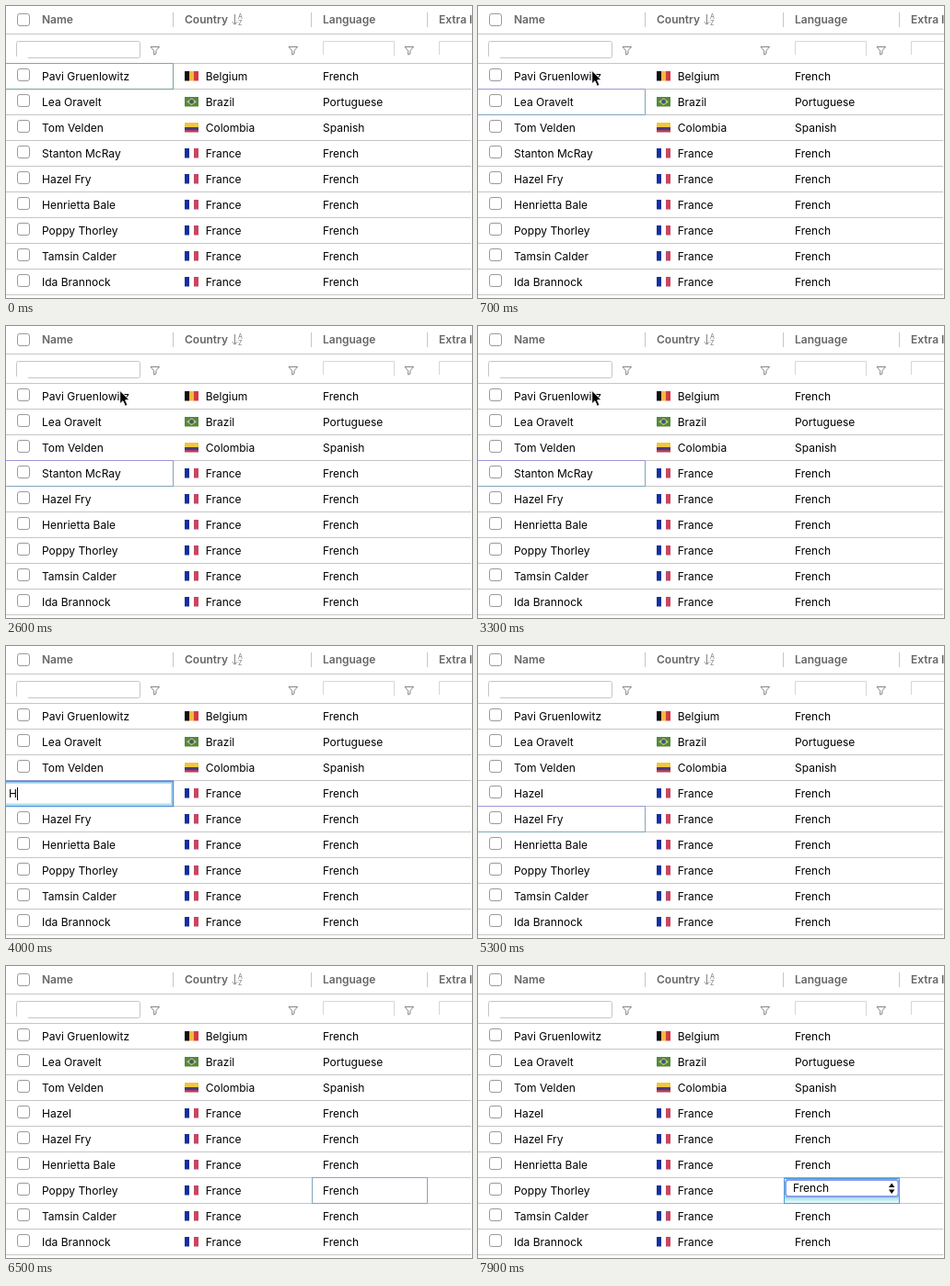
These frames come from a looping animation (506 by 318 pixels, 8 s). An HTML page:

```html
<!DOCTYPE html>
<html lang="en">
<head>
<meta charset="utf-8">
<style>
  html, body { margin: 0; width: 100%; height: 100%; overflow: hidden; background: #fff; }
  svg { display: block; width: 100vw; height: 100vh; }
  text { font: 12px Inter, Roboto, sans-serif; fill: #000; white-space: pre; }
  .head { font-weight: 600; fill: #666; }
  .line { stroke: #c6c6c6; fill: none; }
  .faint { stroke: #d6d6d6; fill: none; }
  .box { stroke: #9a9a9a; fill: #fff; }
  .icon { stroke: #858585; fill: none; }
</style>
</head>
<body>
<svg id="stage" viewBox="0 0 506 318">
  <defs>
    <linearGradient id="fade" x2="0" y2="1">
      <stop stop-color="#8ed8e0"/><stop offset="1" stop-color="#f2fdfd"/>
    </linearGradient>
  </defs>
  <g id="grid"></g>
  <g id="focus" fill="none">
    <path id="sides"/><path id="top"/>
  </g>
  <g id="editor">
    <rect x="-2" y="147" width="184" height="27.5" fill="#fff"/>
    <rect x="-2" y="149" width="182" height="23.5" fill="none" stroke="#a9e3ec" stroke-width="2"/>
    <rect x="-2" y="147.5" width="183.5" height="27" fill="none" stroke="#5d8fdc" stroke-width="1.5"/>
    <text id="typed" x="3" y="165"></text>
    <path id="caret" stroke="#000"/>
  </g>
  <g id="select">
    <rect x="332.5" y="231.5" width="125" height="27" fill="#fff" stroke="#4a9fdc"/>
    <rect x="333" y="251" width="124" height="7" fill="url(#fade)"/>
    <rect x="334" y="233" width="122.5" height="18" rx="3" fill="#fff" stroke="#8f9bea" stroke-width="2"/>
    <text x="342" y="246">French</text>
    <path d="M446 241l3.2-4.5 3.2 4.5zM446 243.5l3.2 4.5 3.2-4.5z"/>
  </g>
  <path id="pointer" d="M123.7 70.3v14.5l3.3-3.1 2.4 5.6 2.6-1.1-2.4-5.5h4.5z" stroke="#fff"/>
</svg>
<script>
const $ = id => document.getElementById(id);
const LOOP = 8000, ROW = 28, TOP = 62.5;

const people = [
  ["Pavi Gruenlowitz", "Belgium", "French"],
  ["Lea Oravelt", "Brazil", "Portuguese"],
  ["Tom Velden", "Colombia", "Spanish"],
  ["Stanton McRay", "France", "French"],
  ["Hazel Fry", "France", "French"],
  ["Henrietta Bale", "France", "French"],
  ["Poppy Thorley", "France", "French"],
  ["Tamsin Calder", "France", "French"],
  ["Ida Brannock", "France", "French"]
];
const newName = "Hazel", editRow = 3;

const columns = [[-1.5, 181.5], [182.5, 331.5], [332.5, 457.5]];
// start time, column, row
const focusSteps = [
  [0, 0, 0], [700, 0, 1], [1500, 0, 2], [2000, 0, 3], [4700, 0, 4],
  [5500, 0, 5], [5900, 0, 6], [6100, 1, 6], [6300, 2, 6]
];
const keyTimes = [3800, 4100, 4250, 4400, 4550];
const pointerShown = 300, commit = 4700, selectOpen = 7300;

const text = (x, y, s, attrs = "") => `<text x="${x}" y="${y}" ${attrs}>${s}</text>`;
const rect = (x, y, w, h, fill) => `<rect x="${x}" y="${y}" width="${w}" height="${h}" fill="${fill}"/>`;
const path = (d, cls = "line") => `<path class="${cls}" d="${d}"/>`;
const checkbox = y => `<rect class="box" x="12.5" y="${y}" width="13" height="13" rx="2.5"/>`;
const columnBands = (...fills) => fills.map((c, i) => rect(i * 5, 0, 5, 10.5, c)).join("");

const flags = {
  Belgium: columnBands("#111", "#f6b83a", "#d23a42"),
  France: columnBands("#12309c", "#fff", "#c94560"),
  Brazil: rect(0, 0, 15, 10.5, "#55883f") +
    '<path d="M7.5 1.2L13 5.2 7.5 9.2 2 5.2z" fill="#c3c765"/><circle cx="7.5" cy="5.2" r="2.4" fill="#3f5a78"/>',
  Colombia: rect(0, 0, 15, 5, "#f3c544") + rect(0, 5, 15, 3, "#4b3a80") + rect(0, 8, 15, 2.5, "#b04058")
};

function buildGrid() {
  let out = path("M0 30.5H506M0 62.5H506") + path("M181.5 7V23M331.5 7V23M457.5 7V23") + checkbox(8.5);
  [["Name", 39], ["Country", 194], ["Language", 344], ["Extra Info", 470]]
    .forEach(([s, x]) => out += text(x, 19, s, 'class="head"'));

  // sort marker
  out += path("M248.5 9V20M245.8 17.2L248.5 20.2 251.2 17.2", "icon") +
    text(252, 14, "A", 'style="font-size:7px;fill:#777"') +
    text(252, 21, "Z", 'style="font-size:7px;fill:#777"');

  // filter fields
  out += path("M11.5 55V40.5Q11.5 38.5 13.5 38.5H143.5Q145.5 38.5 145.5 40.5V54.5Q145.5 56.5 143.5 56.5H24");
  out += path("M344.5 53V38.5H421.5V54M470.5 53V38.5H506", "faint");
  for (const x of [157, 307, 433])
    out += path(`M${x} 44.5h9.6l-3.6 4.2v3.2l-2.3 1.2v-4.4z`, "icon");

  people.forEach(([name, country, language], i) => {
    const y = TOP + i * ROW, base = y + 18.5;
    out += path(`M0 ${y + ROW}H505`) + checkbox(y + 6) +
      text(39, base, name, `id="name${i}"`) +
      `<g transform="translate(194 ${y + 8.5})">${flags[country]}</g>` +
      text(216.7, base, country) + text(344, base, language);
  });
  $("grid").innerHTML = out;
}

const show = (id, on) => $(id).setAttribute("display", on ? "inline" : "none");

function drawFocus(t) {
  const [, col, row] = focusSteps.filter(s => s[0] <= t).pop();
  const [left, right] = columns[col], y = TOP + row * ROW;
  $("top").setAttribute("d", `M${left} ${y}H${right}`);
  $("top").setAttribute("stroke", row ? "#9f95d8" : "#7fa8a4");
  $("sides").setAttribute("d", `M${left} ${y}V${y + ROW}H${right}V${y}`);
  $("sides").setAttribute("stroke", row ? "#80a6ba" : "#6fa39e");
}

function frame(now) {
  const t = now % LOOP;
  const editing = t >= keyTimes[0] && t < commit;
  drawFocus(t);
  $("name" + editRow).textContent = t < commit ? people[editRow][0] : newName;
  show("pointer", t >= pointerShown && t < keyTimes[0]);
  show("editor", editing);
  show("select", t >= selectOpen);
  if (editing) {
    $("typed").textContent = newName.slice(0, keyTimes.filter(k => k <= t).length);
    const x = 3.5 + Math.round($("typed").getComputedTextLength());
    $("caret").setAttribute("d", `M${x} 154V168`);
  }
  requestAnimationFrame(frame);
}

buildGrid();
requestAnimationFrame(frame);
</script>
</body>
</html>
```
